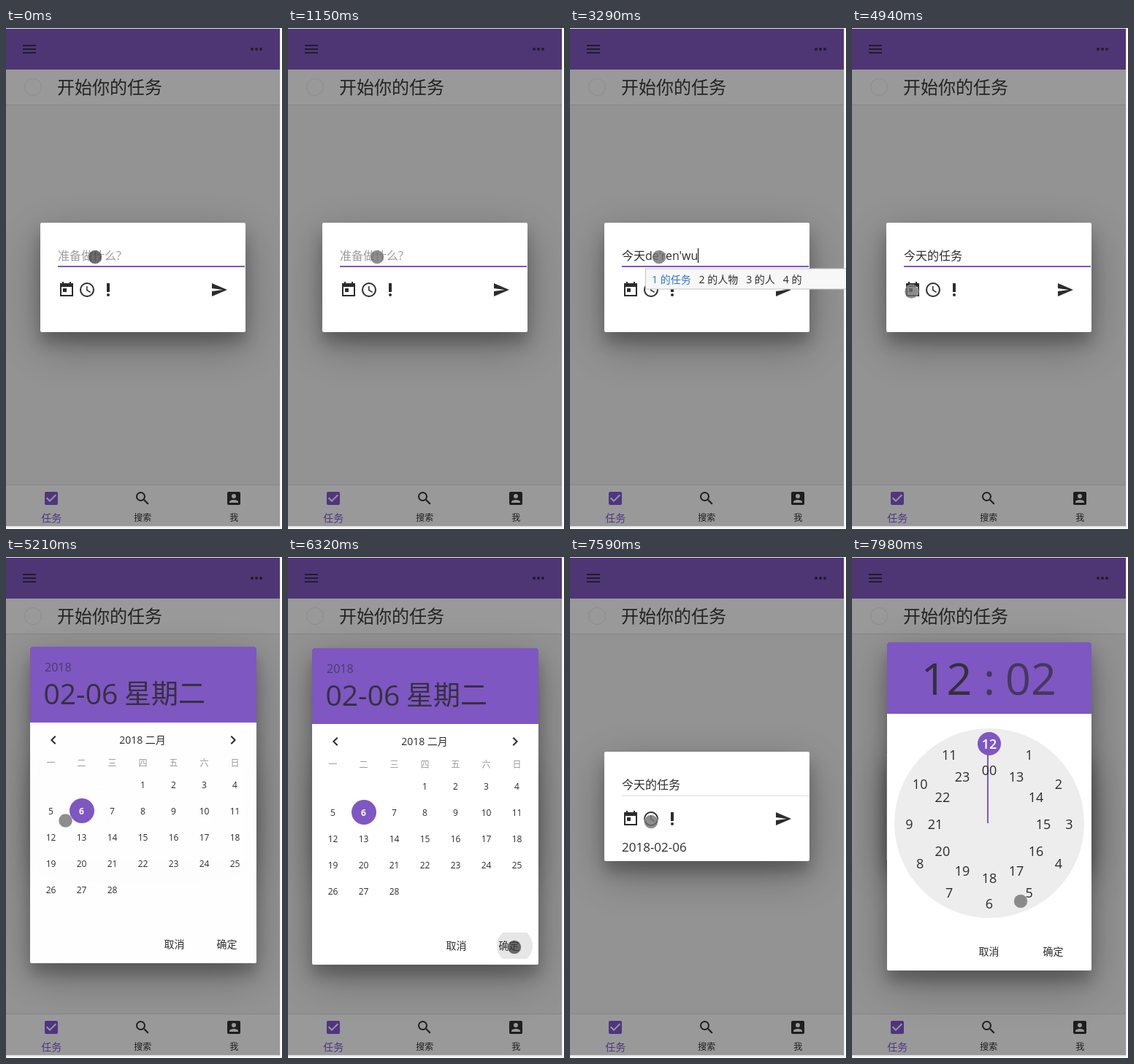
Write an HTML page that moves like this. It is 378 by 687 pixels and loops after 8000 ms.

```html
<!DOCTYPE html>
<html lang="zh">
<head>
<meta charset="utf-8">
<style>
html, body { margin: 0; width: 100%; height: 100%; overflow: hidden; background: #fff }
svg { display: block }
text { font-family: "Open Sans", "Noto Sans CJK SC", sans-serif; white-space: pre }
</style>
</head>
<body>
<svg id="stage" width="378" height="687" viewBox="0 0 378 687"></svg>
<script>
const LOOP = 8000, STEP = 138, PHASE = 93;
const PURPLE = '#7e57c2', INK = '#2c2c2c', BAR = '#999';

const rect = (x, y, w, h, fill, more = '') =>
  `<rect x="${x}" y="${y}" width="${w}" height="${h}" fill="${fill}" ${more}/>`;
const disc = (x, y, r, fill, more = '') =>
  `<circle cx="${x}" cy="${y}" r="${r}" fill="${fill}" ${more}/>`;
const text = (s, x, y, size, fill = INK, more = '') =>
  `<text x="${x}" y="${y}" font-size="${size}" fill="${fill}" ${more}>${s}</text>`;
const mid = (s, x, y, size, fill = INK, more = '') =>
  text(s, x, y, size, fill, 'text-anchor="middle" ' + more);
const line = (d, width = 2, stroke = 'currentColor') =>
  `<path d="${d}" fill="none" stroke="${stroke}" stroke-width="${width}"/>`;
const spot = (x, y) => disc(x, y, 2, 'currentColor');
const tile = rect(3, 3, 18, 18, 'currentColor', 'rx="2"');

// Icons on a 24 px square
const ICONS = {
  menu: line('M3 7h18M3 12h18M3 17h18'),
  more: spot(6, 12) + spot(12, 12) + spot(18, 12),
  check: tile + line('M5.7 11.3l4.3 4.3 8.3-8.3', 2, BAR),
  search: disc(9.5, 9.5, 5.5, 'none', 'stroke="currentColor" stroke-width="2"') + line('M14 14l5.8 5.8', 2.2),
  me: tile + disc(12, 9, 3, BAR) + `<path d="M6 18v-1c0-4 12-4 12 0v1z" fill="${BAR}"/>`,
  today: line('M4 4h16v16H4z') + line('M3 5.5h18', 5) + line('M7 1v3M17 1v3') + line('M7 12.5h5', 5),
  clock: disc(12, 12, 9, 'none', 'stroke="currentColor" stroke-width="2"') + line('M11.8 7v5.5l4.8 2.9', 1.5),
  alert: line('M12 3v12', 4) + spot(12, 19),
  send: '<path d="M2 21L23 12 2 3v7l15 2-15 2z" fill="currentColor"/>',
  prev: line('M14.7 6.7L9.4 12l5.3 5.3'),
  next: line('M9.3 6.7l5.3 5.3-5.3 5.3')
};
const icon = (name, x, y, color = INK) =>
  `<g transform="translate(${x} ${y})" color="${color}">${ICONS[name]}</g>`;

const panel = (x, y, w, h) =>
  rect(x, y + 19, w, h, '#000', 'opacity=".3" style="filter:blur(30px)"') +
  rect(x, y + 15, w, h, '#000', 'opacity=".22" style="filter:blur(10px)"') +
  rect(x, y, w, h, '#fff', 'rx="2"');
const head = (x, y, w, h) => rect(x, y, w, h, PURPLE, 'rx="2"') + rect(x, y + 4, w, h - 4, PURPLE);

function page() {
  const tabs = [['check', '任务', 14, '#4f3580'], ['search', '搜索', 12, '#1e1e1e'], ['me', '我', 12, '#1e1e1e']];
  return rect(0, 0, 375, 683, '#939393') +
    rect(0, 0, 375, 57, '#4e3675') + icon('menu', 20, 17, '#221b2c') + icon('more', 331, 17, '#221b2c') +
    rect(0, 57, 375, 48, BAR) + rect(0, 105, 375, 1, '#858585') +
    disc(37, 81, 11.5, 'none', 'stroke="#8c8c8c"') +
    text('开始你的任务', 70, 89.5, 24, '#222') +
    rect(0, 626, 375, 1, '#868686') + rect(0, 627, 375, 56, BAR) +
    tabs.map(([name, label, size, color], i) =>
      icon(name, 50 + 125 * i, 633, color) + mid(label, 62.3 + 125 * i, 669 + size * .58, size, color)).join('');
}

function taskForm() {
  return panel(47, 267, 281, 150) +
    rect(71, 326, 256, 2, PURPLE, 'id="line"') +
    text('', 71, 318, 16, INK, 'id="entry"') +
    rect(0, 302, 1, 20, '#000', 'id="caret"') +
    icon('today', 71, 347) + icon('clock', 99, 347) + icon('alert', 128, 347) + icon('send', 280, 347) +
    text('2018-02-06', 71, 404, 17, INK, 'id="due"') +
    rect(47, 267, 281, 150, '#000', 'id="dim" opacity=".4"');
}

function datePicker() {
  let s = panel(33, 125, 310, 434) + head(33, 125, 310, 104) +
    text('2018', 53, 159, 16, '#4c3b69') +
    text('02-06', 51.5, 204, 39, '#37303f') + text('星期二', 162, 203, 37, '#37303f') +
    icon('prev', 53, 241) + icon('next', 299, 241) + mid('2018 二月', 187, 258, 14);
  [...'一二三四五六日'].forEach((d, i) => s += mid(d, 61.5 + 42 * i, 289, 12, '#9a9a9a'));
  s += disc(104, 350, 17, PURPLE);
  for (let d = 1; d <= 28; d++) {
    const cell = d + 2, x = 61.5 + 42 * (cell % 7), y = 319 + 36 * Math.floor(cell / 7);
    s += d == 6 ? mid(d, x, y, 12, '#fff', 'font-weight="700"') : mid(d, x, y, 12);
  }
  return s + `<clipPath id="button">${rect(270, 515, 65, 36, '#000', 'rx="2"')}</clipPath>` +
    disc(310.5, 533, 0, '#e6e6e6', 'id="ripple" clip-path="url(#button)"') +
    mid('取消', 230.5, 538, 14) + mid('确定', 302.5, 538, 14);
}

function timePicker() {
  let s = panel(48, 117, 280, 450) + head(48, 117, 280, 98) +
    mid('12', 129.5, 189, 61, '#352f3c') + mid(':', 188, 189, 61, '#45385c') + mid('02', 245, 189, 61, '#45385c') +
    disc(188, 365, 130, '#ededed') + rect(185, 266, 2, 99, PURPLE) + disc(188, 256, 16, PURPLE);
  for (let h = 1; h <= 24; h++) {
    const r = h > 12 ? 74 : 109.5, a = h * Math.PI / 6;
    s += mid(h % 24 || '00', 188 + r * Math.sin(a), 372.5 - r * Math.cos(a), 18,
      h == 12 ? '#fff' : INK, h == 12 ? 'font-weight="600"' : '');
  }
  return s + mid('取消', 187.5, 546, 14) + mid('确定', 275.5, 546, 14);
}

const $ = id => document.getElementById(id);
$('stage').innerHTML =
  rect(0, 0, 376, 685, '#e4e4e4') +
  `<svg y="1" width="375" height="682" viewBox="0 1 375 682">${page()}${taskForm()}` +
  `<g id="date">${datePicker()}</g><g id="time">${timePicker()}</g></svg>` +
  '<g id="ime">' + rect(0, 330, 307, 28, '#f7f7f7', 'id="imeBox" stroke="#c4c4c4"') +
  text('', 0, 349.5, 14, INK, 'id="words"') + '</g>' +
  disc(0, 0, 9.5, 'none', 'id="dot" stroke="#fff" stroke-opacity=".5"');

const PHRASES = [
  { from: 1450, to: 2040, keys: "jin't", words: '今天 金坛 金条 尽头 津贴' },
  { from: 2320, to: 3410, keys: "de'ren'wu", words: '的任务 的人物 的人 的' }
];
const KEY_TIME = 110;

// start, duration and end point of each pointer move
const MOVES = [[3850, 100, 167, 381], [4200, 450, 81.5, 361.5], [5400, 600, 310, 535],
  [6500, 500, 111, 363], [7600, 350, 231, 472]];

const clamp = v => Math.max(0, Math.min(1, v));
const easeOut = p => 1 - (1 - clamp(p)) ** 5;
const smooth = p => (p = clamp(p), p * p * (3 - 2 * p));
const within = (t, ...spans) => spans.some(([a, b]) => t >= a && t < b);
const show = (id, on) => $(id).setAttribute('visibility', on ? 'visible' : 'hidden');
const set = (id, attrs) => { for (const k in attrs) $(id).setAttribute(k, attrs[k]); };
const snap = t => Math.max(0, Math.floor((t - PHASE) / STEP) * STEP + PHASE);

function drawEntry(t) {
  const done = t < 2040 ? '' : t < 3410 ? '今天' : '今天的任务';
  const phrase = PHRASES.find(p => within(t, [p.from, p.to]));
  const typed = done + (phrase ? phrase.keys.slice(0, 1 + (t - phrase.from) / KEY_TIME) : '');
  $('entry').textContent = typed || '准备做什么?';
  set('entry', { fill: typed ? INK : '#9c9c9c' });
  set('caret', { x: 71 + (typed ? Math.round($('entry').getComputedTextLength()) : 0) });
  show('caret', within(t, [440, 1030], [1450, 3970], [4540, 4940]));

  show('ime', phrase);
  if (phrase) {
    const left = 71 + 16 * done.length;
    set('imeBox', { x: left + .5 });
    set('words', { x: left + 9 });
    $('words').innerHTML = phrase.words.split(' ')
      .map((w, i) => `<tspan fill="${i ? INK : '#2f73c9'}">${i + 1} ${w}</tspan>`).join('   ');
  }
  const focus = t < 5060;
  set('line', { y: focus ? 326 : 327, height: focus ? 2 : 1, fill: focus ? PURPLE : '#ddd' });
  show('due', t >= 6470);
  show('dim', within(t, [5060, 6470], [7600, LOOP]));
}

function place(id, visible, amount, dy) {
  set(id, {
    display: visible ? 'inline' : 'none',
    opacity: clamp(amount * 1.05),
    transform: `translate(0 ${Math.round(dy)})`
  });
}

function drawPickers(t, now) {
  const enter = easeOut((t - 5000) / 450), leave = easeOut((t - 6400) / 450);
  place('date', within(now, [5060, 6870]), enter * (1 - leave), 43 * (enter - 1 + leave));
  set('ripple', { r: 24.5 * clamp((t - 6070) / 230) });
  const open = easeOut((t - 7480) / 450);
  place('time', now >= 7600, open, 45 * (open - 1));
}

function drawDot(t, now) {
  let cx = 122, cy = 314;
  for (const [from, time, x, y] of MOVES) {
    const p = smooth((t - from) / time);
    cx += (x - cx) * p;
    cy += (y - cy) * p;
  }
  const pressed = within(now, [0, 1150], [6170, 6470]);
  set('dot', { cx, cy, fill: pressed ? 'rgba(60,60,60,.75)' : 'rgba(112,112,112,.8)' });
}

function frame() {
  const now = performance.now() % LOOP, t = snap(now);
  drawEntry(now);
  drawPickers(t, now);
  drawDot(t, now);
  requestAnimationFrame(frame);
}
frame();
</script>
</body>
</html>
```
